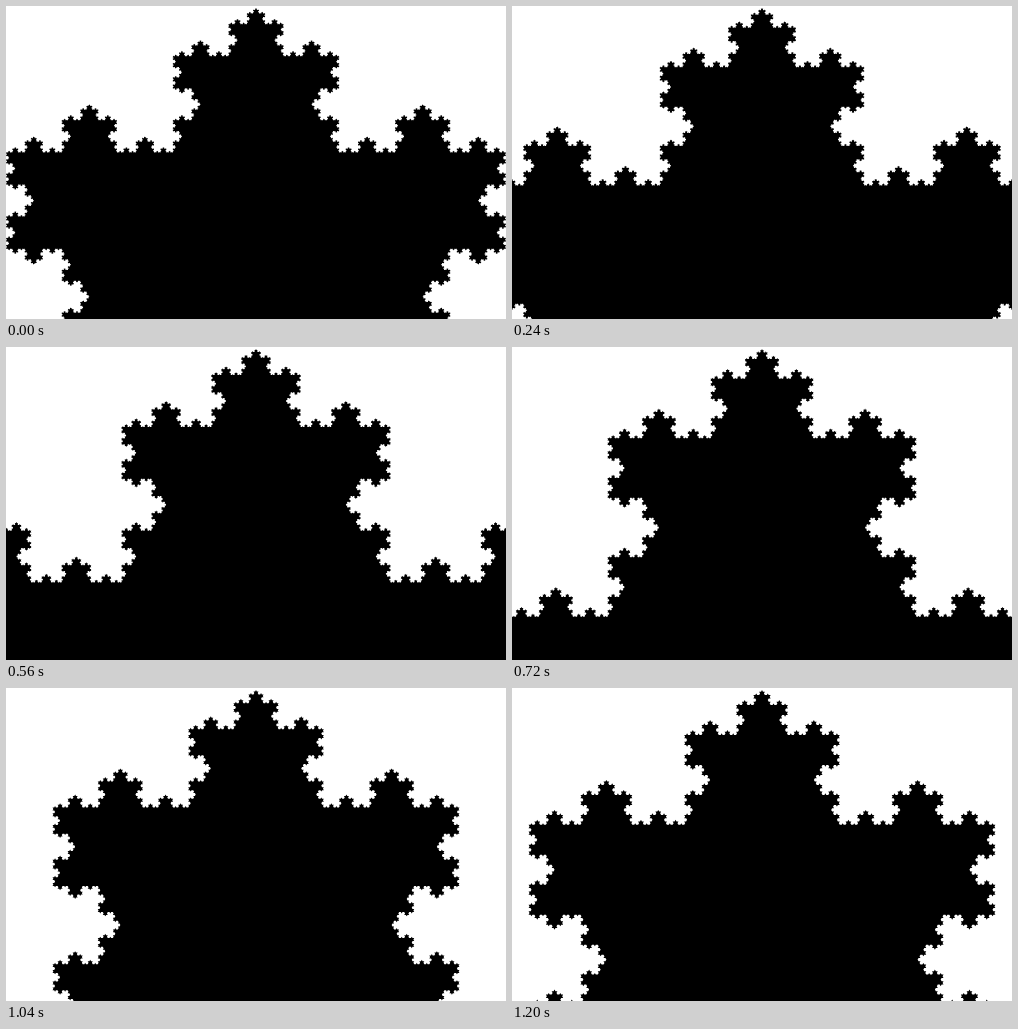
Recreate the animation shown at these times as an HTML page with a canvas. Size 500x313 px, loop 1280 ms.

```html
<!DOCTYPE html>
<html lang="en">
<head>
<meta charset="utf-8">
<title>Koch curve zoom</title>
<style>
  html, body { margin: 0; width: 100%; height: 100%; overflow: hidden; background: #fff; }
  canvas { display: block; }
</style>
</head>
<body>
<canvas id="stage" width="500" height="313"></canvas>
<script>
const ctx = document.getElementById('stage').getContext('2d');
const W = 500, H = 313;
const APEX_X = 250, APEX_Y = 2.1;
const LOOP = 1280, STEPS = 16;
const SIDE = 1500, DEPTH = 7;
const SIN60 = Math.sqrt(3) / 2;

// Adds a Koch curve from (x, y) along (dx, dy), bulging to the left of travel.
function koch(x, y, dx, dy, depth) {
  const reach = Math.hypot(dx, dy);
  const mx = x + dx / 2, my = y + dy / 2;
  const hidden = mx + reach < 0 || mx - reach > W || my - reach > H;
  if (depth === 0 || hidden) {
    ctx.lineTo(x + dx, y + dy);
    return;
  }
  const ax = dx / 3, ay = dy / 3;
  const ux = ax / 2 + ay * SIN60, uy = ay / 2 - ax * SIN60;
  const vx = ax - ux, vy = ay - uy;
  const d = depth - 1;
  koch(x, y, ax, ay, d);
  koch(x + ax, y + ay, ux, uy, d);
  koch(x + ax + ux, y + ay + uy, vx, vy, d);
  koch(x + 2 * ax, y + 2 * ay, ax, ay, d);
}

function draw(step) {
  // One loop enlarges the curve threefold, which maps it onto itself.
  const side = SIDE * Math.pow(3, step / STEPS);
  const half = side / 2, drop = side * SIN60;
  ctx.fillStyle = '#fff';
  ctx.fillRect(0, 0, W, H);
  ctx.fillStyle = '#000';
  ctx.beginPath();
  ctx.moveTo(APEX_X - half, APEX_Y + drop);
  koch(APEX_X - half, APEX_Y + drop, half, -drop, DEPTH);
  koch(APEX_X, APEX_Y, half, drop, DEPTH);
  ctx.closePath();
  ctx.fill();
}

const start = performance.now();
let shown = -1;

function tick() {
  const t = (performance.now() - start) % LOOP;
  const step = Math.floor(t / LOOP * STEPS);
  if (step !== shown) {
    draw(step);
    shown = step;
  }
  requestAnimationFrame(tick);
}
tick();
</script>
</body>
</html>
```
